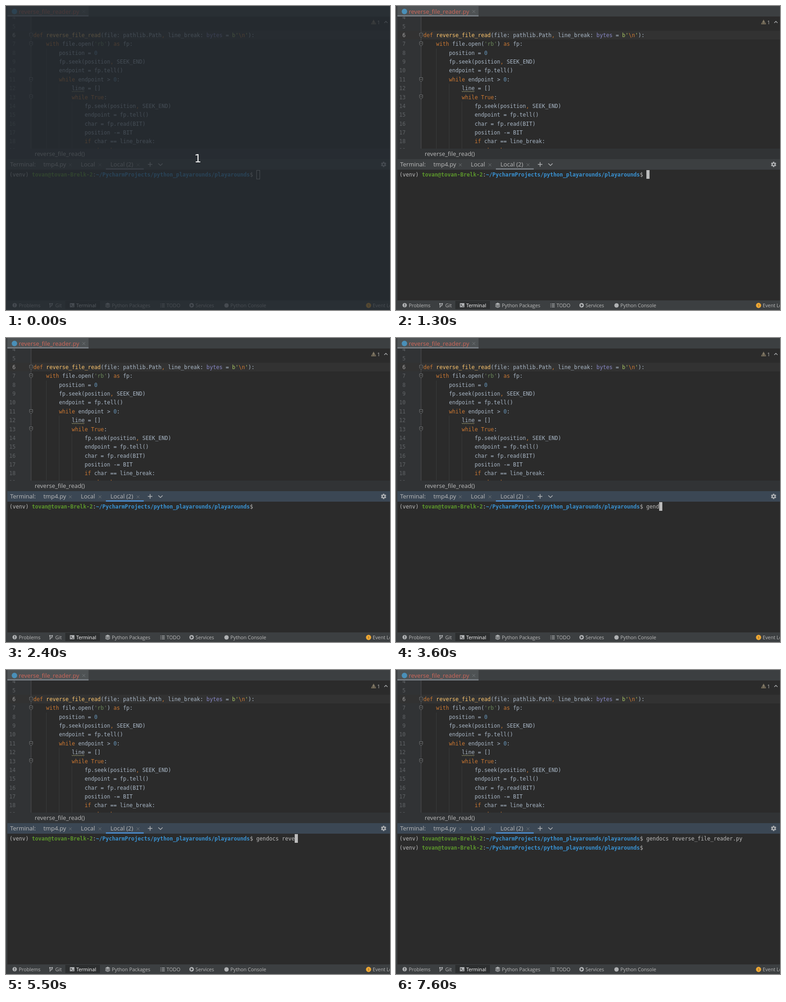
These frames come from a looping animation (842x665 px, 8 s). An HTML page with a canvas:

```html
<!DOCTYPE html>
<html lang="en">
<head>
<meta charset="utf-8">
<title>Terminal session</title>
<style>
  html, body { margin: 0; width: 842px; height: 665px; overflow: hidden; background: #2b2b2b; }
  canvas { display: block; }
</style>
</head>
<body>
<canvas id="stage" width="842" height="665"></canvas>
<script>
const ctx = document.getElementById('stage').getContext('2d');
const W = 842, H = 665, LOOP = 8000;
const CELL = 7.03, ROW = 19.36;
const MONO = '11.68px "DejaVu Sans Mono", monospace';
const UI = '13px "Open Sans", "Noto Sans", sans-serif';
const SMALL = '10.75px "Open Sans", "Noto Sans", sans-serif';
const PANEL = '#3c3f41', DARK = '#2b2b2b', LIGHT = '#bbbbbb', ICON = '#afb1b3';

const CODE = [
  "def reverse_file_read(file: pathlib.Path, line_break: bytes = b'\\n'):",
  "    with file.open('rb') as fp:",
  "        position = 0",
  "        fp.seek(position, SEEK_END)",
  "        endpoint = fp.tell()",
  "        while endpoint > 0:",
  "            line = []",
  "            while True:",
  "                fp.seek(position, SEEK_END)",
  "                endpoint = fp.tell()",
  "                char = fp.read(BIT)",
  "                position -= BIT",
  "                if char == line_break:",
  "                    break"
];
const TOKEN = /(\b(?:def|with|as|while|True|if|break|bytes|reverse_file_read|0)\b|'rb'|b'|\\n|'|,)/;
const TOKEN_COLORS = {
  reverse_file_read: '#ffc66d', bytes: '#8888c6', '0': '#6897bb',
  "'rb'": '#6a8759', "b'": '#a5c261', "'": '#a5c261'
};
for (const word of ['def', 'with', 'as', 'while', 'True', 'if', 'break', '\\n', ',']) {
  TOKEN_COLORS[word] = '#cc7832';
}

const PROMPT = [
  ['(venv) ', LIGHT],
  ['tovan@tovan-Brelk-2', '#5c962c', true],
  [':', LIGHT],
  ['~/PycharmProjects/python_playarounds/playarounds', '#3993d4', true],
  ['$ ', LIGHT]
];
const PROMPT_LENGTH = PROMPT.reduce((sum, part) => sum + part[0].length, 0);
const COMMAND = 'gendocs reverse_file_reader.py ';
// [time, characters typed]
const TYPING = [
  [2700, 1], [2900, 2], [3000, 3], [3600, 4], [3700, 5], [4000, 7], [4600, 8],
  [5000, 9], [5200, 10], [5500, 12], [5700, 13], [5900, 14], [6100, 15], [6300, 31]
];
const CURSOR_HIDDEN = [[2400, 2700], [4500, 4600], [7600, LOOP]];

function rect(x, y, w, h, color) {
  ctx.fillStyle = color;
  ctx.fillRect(x, y, w, h);
}

function text(str, x, y, font, color) {
  ctx.font = font;
  ctx.fillStyle = color;
  ctx.fillText(str, x, y);
}

function line(points, color, width = 1, closed = false) {
  ctx.beginPath();
  points.forEach(([x, y]) => ctx.lineTo(x, y));
  if (closed) ctx.closePath();
  ctx.strokeStyle = color;
  ctx.lineWidth = width;
  ctx.stroke();
}

function polygon(points, color) {
  ctx.beginPath();
  points.forEach(([x, y]) => ctx.lineTo(x, y));
  ctx.fillStyle = color;
  ctx.fill();
}

function disc(x, y, r, color) {
  ctx.beginPath();
  ctx.arc(x, y, r, 0, Math.PI * 2);
  ctx.fillStyle = color;
  ctx.fill();
}

function cross(x, y) {
  line([[x - 3, y - 3], [x + 3, y + 3]], '#74787a');
  line([[x + 3, y - 3], [x - 3, y + 3]], '#74787a');
}

function foldMark(y) {
  const shield = [[51.5, y - 4.5], [58.5, y - 4.5], [58.5, y + 1.5], [55, y + 4.5], [51.5, y + 1.5]];
  polygon(shield, DARK);
  line(shield, '#707375', 1, true);
  line([[53, y - 0.5], [57, y - 0.5]], '#707375');
}

function drawTabBar() {
  rect(0, 0, W, 23, PANEL);
  rect(3, 0, 178, 20, '#4e5254');
  rect(3, 20, 178, 3, '#747a80');
  disc(18.5, 12, 6, '#4a8fb8');
  text('reverse_file_reader.py', 28, 17, UI, '#d1675a');
  cross(170.5, 12);
}

function drawEditor() {
  const rowCenter = n => 63.7 + (n - 6) * ROW;
  ctx.save();
  ctx.beginPath();
  ctx.rect(3, 23, W - 3, 289);
  ctx.clip();
  rect(3, 23, W, 289, DARK);
  rect(3, 23, 52, 289, '#313335');
  rect(3, 54, W, 19, '#323232');
  rect(54.5, 23, 1, 289, '#555555');
  [[88, 93], [116, 170], [144, 209]].forEach(([x, y]) => rect(x, y, 1, 312 - y, '#393b3b'));

  for (let n = 4; n <= 19; n++) {
    text(String(n).padStart(2), 7, rowCenter(n) + 4.3, MONO, n === 6 ? '#a4a3a3' : '#606366');
  }
  CODE.forEach((source, i) => {
    let col = 0;
    for (const token of source.split(TOKEN)) {
      text(token, 60 + col * CELL, rowCenter(i + 6) + 4.3, MONO, TOKEN_COLORS[token] || '#a9b7c6');
      col += token.length;
    }
  });
  [6, 7, 11, 13].forEach(n => foldMark(Math.round(rowCenter(n))));

  const wave = [];
  for (let x = 144; x <= 172; x += 2) wave.push([x, x % 4 ? 188 : 186]);
  line(wave, '#96966f');

  const triangle = [[806, 30.5], [811, 39.5], [801, 39.5]];
  polygon(triangle, '#5d5648');
  line(triangle, '#847963', 1, true);
  rect(805.5, 33, 1, 3.5, '#c0b7a5');
  rect(805.5, 37.5, 1, 1, '#c0b7a5');
  text('1', 814, 39.5, SMALL, LIGHT);
  line([[829.5, 37], [833, 33.5], [836.5, 37]], ICON, 1.4);
  ctx.restore();

  rect(3, 312, W, 23, '#313335');
  text('reverse_file_read()', 63, 328, UI, LIGHT);
}

function drawGear(x, y) {
  ctx.save();
  ctx.translate(x, y);
  for (let i = 0; i < 6; i++) {
    ctx.rotate(Math.PI / 3);
    rect(-1.5, -5.8, 3, 4, ICON);
  }
  ctx.restore();
  disc(x, y, 4.2, ICON);
}

function drawTerminalHeader(focused) {
  const background = focused ? '#3b4754' : PANEL;
  rect(3, 335, W, 23, background);
  text('Terminal:', 9, 351, UI, LIGHT);
  text('tmp4.py', 82, 351, UI, LIGHT);
  text('Local', 164, 351, UI, LIGHT);
  text('Local (2)', 229, 351, UI, LIGHT);
  [141, 206, 289.5].forEach(x => cross(x, 347.5));
  rect(219, 355, 83, 3, focused ? '#4a88c7' : '#747a80');
  line([[311, 346.5], [321, 346.5]], ICON, 1.6);
  line([[316, 341.5], [316, 351.5]], ICON, 1.6);
  line([[334, 344.5], [338.7, 349], [343.4, 344.5]], ICON, 1.6);
  drawGear(828, 346.5);
  disc(828, 346.5, 1.9, background);
}

function drawPrompt(row) {
  let col = 0;
  for (const [str, color, bold] of PROMPT) {
    text(str, 7.5 + col * CELL, 373.3 + row * ROW, (bold ? 'bold ' : '') + MONO, color);
    col += str.length;
  }
}

function drawCursor(col, row, hollow) {
  const left = Math.round(7.5 + col * CELL);
  const right = Math.round(7.5 + (col + 1) * CELL);
  const top = 359 + Math.round(row * ROW);
  if (hollow) {
    ctx.strokeStyle = LIGHT;
    ctx.lineWidth = 1;
    ctx.strokeRect(left + 0.5, top + 0.5, right - left, 19);
  } else {
    rect(left, top, right - left, 19, LIGHT);
  }
}

function drawTerminal(t) {
  rect(3, 358, W, 286, DARK);
  const typed = TYPING.reduce((count, [time, n]) => t >= time ? n : count, 0);
  drawPrompt(0);
  text(COMMAND.slice(0, typed), 7.5 + PROMPT_LENGTH * CELL, 373.3, MONO, LIGHT);
  if (t >= 7000) drawPrompt(1);

  if (CURSOR_HIDDEN.some(([from, to]) => t >= from && t < to)) return;
  const row = t >= 6900 ? 1 : 0;
  const col = t >= 7000 ? PROMPT_LENGTH : row ? 0 : PROMPT_LENGTH + typed;
  drawCursor(col, row, t < 1300);
}

function drawToolIcons() {
  disc(19, 654.5, 4.8, ICON);
  rect(18.3, 651.5, 1.5, 4, PANEL);
  rect(18.3, 656.3, 1.5, 1.5, PANEL);

  line([[96.5, 651], [96.5, 660]], ICON, 1.4);
  line([[101, 652], [101, 655], [97, 657]], ICON, 1.4);
  disc(96.5, 651.5, 1.8, ICON);
  disc(101, 651.5, 1.8, ICON);

  rect(140, 650, 10, 9, ICON);
  line([[141.5, 652], [144, 654.3], [141.5, 656.6]], '#2d2f30', 1.2);
  rect(145, 656.2, 3.5, 1.2, '#2d2f30');

  polygon([[223, 649], [228.5, 651.7], [223, 654.4], [217.5, 651.7]], ICON);
  [655, 658].forEach(y => line([[217.8, y - 1], [223, y + 1.5], [228.2, y - 1]], ICON, 1.4));

  [651, 654.3, 657.6].forEach(y => {
    rect(338.5, y, 1.6, 1.4, ICON);
    rect(341.5, y, 6.5, 1.4, ICON);
  });

  disc(407, 654.7, 5, ICON);
  polygon([[405.3, 651.7], [410, 654.7], [405.3, 657.7]], PANEL);

  disc(483.5, 655, 4.8, ICON);
  disc(795, 655, 5.7, '#f0a732');
  text('1', 792.8, 658, '8px "Open Sans", "Noto Sans", sans-serif', '#3c3f41');
}

function drawToolBar() {
  rect(0, 644, W, 21, PANEL);
  rect(130, 645, 76, 18, '#2d2f30');
  drawToolIcons();
  const labels = {
    Problems: 28, Git: 108, Terminal: 154, 'Python Packages': 232, TODO: 352,
    Services: 415.5, 'Python Console': 492, 'Event Log': 804
  };
  for (const [label, x] of Object.entries(labels)) {
    text(label, x, 658.7, SMALL, label === 'Terminal' ? '#ffffff' : LIGHT);
  }
}

function drawCountdown() {
  rect(0, 0, W, H, 'rgba(36, 43, 49, 0.76)');
  text('1', 413, 342, '24px "DejaVu Sans", sans-serif', '#f0f0f0');
}

function draw(t) {
  rect(0, 0, W, H, PANEL);
  drawTabBar();
  drawEditor();
  drawTerminalHeader(t >= 1400);
  drawTerminal(t);
  drawToolBar();
  if (t < 100) drawCountdown();
}

let start;
function tick(now) {
  start ??= now;
  draw((now - start) % LOOP);
  requestAnimationFrame(tick);
}
draw(0);
requestAnimationFrame(tick);
</script>
</body>
</html>
```
